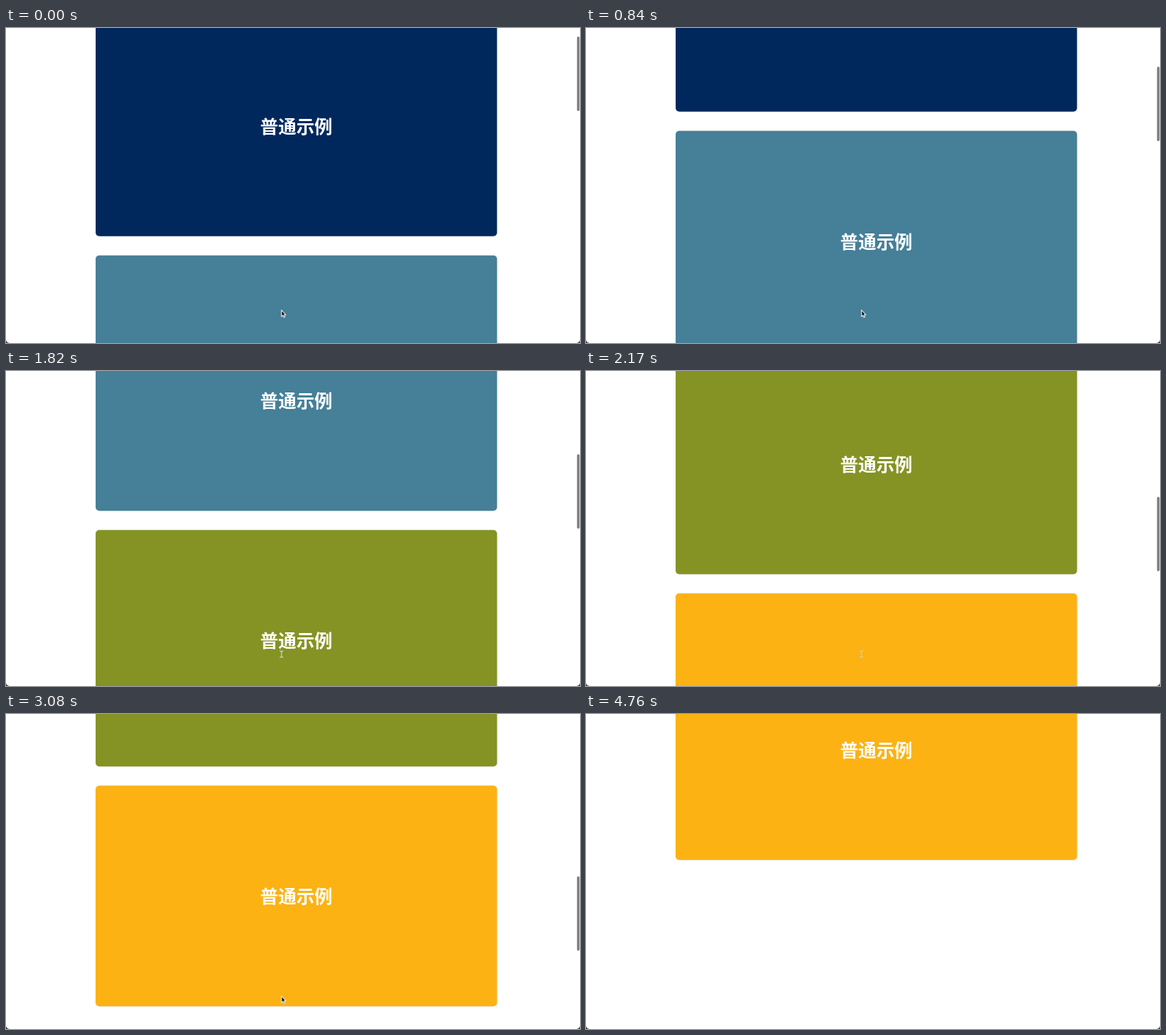
An HTML page with a canvas that plays this animation: 800x440 px, repeating every 5180 ms.

```html
<!DOCTYPE html>
<html lang="zh-CN">
<head>
<meta charset="utf-8">
<title>滚动示例</title>
<style>
  html, body { margin: 0; width: 100%; height: 100%; overflow: hidden; background: #fff; }
  canvas { display: block; width: 800px; height: 440px; }
</style>
</head>
<body>
<canvas id="stage" width="800" height="440"></canvas>
<script>
const ctx = document.getElementById('stage').getContext('2d');
const W = 800, H = 440, LOOP = 5180, STEP = 70;

const card = { x: 125, y: -17.3, w: 559.3, h: 308, pitch: 335, r: 5 };
const colors = ['#00285c', '#457f98', '#849323', '#fcb213'];

// [time, scroll offset]: bursts of scrolling that each slow down
const scrollKeys = [
  [0, 0], [280, 92], [560, 153], [840, 174], [980, 183], [1120, 224],
  [1400, 335], [1680, 412], [1820, 430.5], [2030, 575], [2240, 717],
  [2520, 810], [2800, 853], [3080, 887.5], [3360, 936], [3570, 1007],
  [3780, 1059.5], [3990, 1081], [4340, 1092], [LOOP, 1092]
];

const slope = i => (scrollKeys[i + 1][1] - scrollKeys[i][1]) / (scrollKeys[i + 1][0] - scrollKeys[i][0]);

// Harmonic mean of the neighbouring slopes keeps the curve monotone
function tangent(i) {
  if (i === 0) return slope(0);
  if (i === scrollKeys.length - 1) return 0;
  const a = slope(i - 1), b = slope(i);
  return a * b > 0 ? 2 * a * b / (a + b) : 0;
}

function scrollAt(t) {
  let i = 0;
  while (i < scrollKeys.length - 2 && t >= scrollKeys[i + 1][0]) i++;
  const [t0, s0] = scrollKeys[i], [t1, s1] = scrollKeys[i + 1];
  const d = t1 - t0, u = (t - t0) / d, v = 1 - u;
  return s0 * (1 + 2 * u) * v * v + s1 * u * u * (3 - 2 * u)
    + d * u * v * (tangent(i) * v - tangent(i + 1) * u);
}

function roundBox(x, y, w, h, r, fill) {
  ctx.fillStyle = fill;
  ctx.beginPath();
  ctx.roundRect(x, y, w, h, r);
  ctx.fill();
}

function drawCard(color, y) {
  if (y > H || y + card.h < -4) return;
  ctx.save();
  ctx.shadowColor = 'rgba(0,0,0,0.22)';
  ctx.shadowBlur = 2;
  roundBox(card.x, y, card.w, card.h, card.r, color);
  ctx.restore();
  ctx.fillStyle = '#fff';
  ctx.font = 'bold 25.2px "Noto Sans CJK SC", "Noto Sans CJK", sans-serif';
  ctx.textAlign = 'center';
  ctx.fillText('普通示例', card.x + card.w / 2, y + card.h / 2 + 9.8);
}

function drawArrow() {
  const points = [[384, 394], [384, 403], [386, 401.4], [387.2, 404.2], [388.8, 403.5], [387.6, 400.8], [390, 400.6]];
  ctx.beginPath();
  points.forEach(p => ctx.lineTo(...p));
  ctx.closePath();
  ctx.lineJoin = 'round';
  ctx.lineWidth = 1.1;
  ctx.strokeStyle = '#eee';
  ctx.fillStyle = '#111';
  ctx.fill();
  ctx.stroke();
}

function drawBeam() {
  ctx.strokeStyle = '#c9cbc4';
  ctx.lineWidth = 1.3;
  ctx.beginPath();
  ctx.moveTo(381.5, 391);
  ctx.quadraticCurveTo(384, 391, 384, 393);
  ctx.quadraticCurveTo(384, 391, 386.5, 391);
  ctx.moveTo(384, 392);
  ctx.lineTo(384, 399);
  ctx.moveTo(381.5, 400);
  ctx.quadraticCurveTo(384, 400, 384, 398);
  ctx.quadraticCurveTo(384, 400, 386.5, 400);
  ctx.stroke();
}

function drawCorners() {
  const r = 5;
  ctx.fillStyle = '#444';
  ctx.beginPath();
  ctx.rect(0, H - r, W, r);
  ctx.roundRect(0, H - 2 * r, W, 2 * r, [0, 0, r, r]);
  ctx.save();
  ctx.clip('evenodd');
  ctx.fillRect(0, H - r, r, r);
  ctx.fillRect(W - r, H - r, r, r);
  ctx.restore();
}

function draw(t) {
  const s = scrollAt(t);
  ctx.fillStyle = '#fff';
  ctx.fillRect(0, 0, W, H);
  colors.forEach((color, i) => drawCard(color, card.y + i * card.pitch - s));

  ctx.globalAlpha = Math.min(1, Math.max(0, (4760 - t) / 280));
  roundBox(795.8, 12 + s * 0.242, 3.6, 104, 1.8, '#7f7f7f');
  ctx.globalAlpha = 1;

  if (t >= 1750 && t < 2870) drawBeam();
  else if (t < 4620) drawArrow();
  drawCorners();
}

function tick() {
  const t = performance.now() % LOOP;
  draw(Math.floor(t / STEP) * STEP);
  requestAnimationFrame(tick);
}
tick();
</script>
</body>
</html>
```
